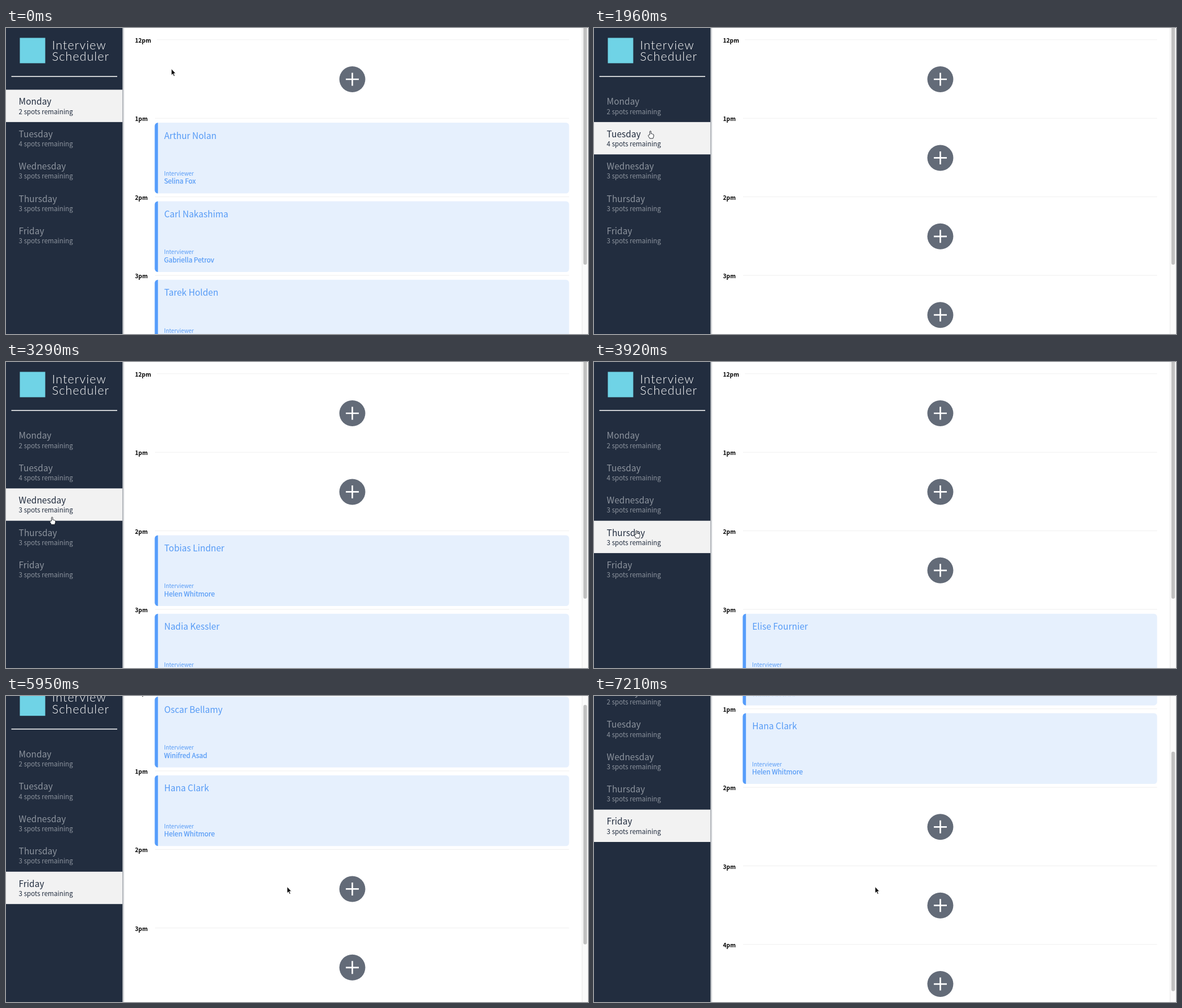
Recreate the animation shown at these times as an HTML page. Size 1031 by 543 pixels, loop 7.28 s.

```html
<!DOCTYPE html>
<html lang="en">
<head>
<meta charset="utf-8">
<title>Interview Scheduler</title>
<style>
html, body { margin: 0; width: 100%; height: 100%; overflow: hidden; background: #fff; }
svg { display: block; width: 1031px; height: 543px; }
text { font-family: 'Noto Sans CJK JP', 'Noto Sans CJK SC', 'Noto Sans CJK KR', 'Noto Sans CJK', sans-serif; }
.title { font: 300 21.5px Lato, sans-serif; letter-spacing: 1.1px; fill: #fff; }
.name { font-size: 15.5px; }
.spots { font-size: 11.6px; font-weight: 300; }
.hour { font-size: 10.2px; font-weight: 700; fill: #000; }
.card { fill: #569bf6; }
.label { font-size: 9.9px; font-weight: 300; }
.who { font-size: 11.9px; stroke: #569bf6; stroke-width: .25px; }
</style>
</head>
<body>
<svg id="stage" viewBox="0 0 1031 543">
  <defs>
    <linearGradient id="shade">
      <stop offset="0" stop-color="#8d929a" stop-opacity=".75"/>
      <stop offset="1" stop-color="#8d929a" stop-opacity="0"/>
    </linearGradient>
  </defs>
  <rect width="1031" height="543" fill="#fff"/>
  <rect width="206.5" height="543" fill="#222d3f"/>
  <g id="page">
    <rect x="24.5" y="17.5" width="45" height="45" fill="#6fd3e6"/>
    <text class="title" x="81.5" y="37.5">Interview</text>
    <text class="title" x="81.5" y="58">Scheduler</text>
    <rect x="9.5" y="85.2" width="187.5" height="1.6" fill="#f4f5f6"/>
    <g id="menu"></g>
    <g id="hours"></g>
  </g>
  <rect x="206.5" width="3.5" height="543" fill="url(#shade)"/>
  <rect x="1020" width="11" height="543" fill="#fafafa"/>
  <rect x="1020" width="1" height="543" fill="#e9e9e9"/>
  <rect id="thumb" x="1022.8" width="6.4" height="425" rx="3.2" fill="#c1c1c1"/>
  <g id="ring" fill="none">
    <circle r="22" stroke="#fff" stroke-opacity=".85" stroke-width="4.8"/>
    <circle r="22" stroke="#0c0f14" stroke-width="2.2"/>
  </g>
  <path id="hand" d="M-1.2 6.6V.9a1.1 1.1 0 0 1 2.2 0V4.6q1.3-.5 1.8.4q1.2-.3 1.6.6q1.4-.1 1.4 1.4V9.2L4.5 13H-1.2L-3.9 8.6Q-4.3 7-2.8 6.8Z" fill="#fff" stroke="#14181f" stroke-width=".9" stroke-linejoin="round"/>
  <path id="arrow" d="M0 0V11.2L2.5 8.9 4.3 13 6.1 12.2 4.3 8.2H7.7Z" fill="#000" stroke="#fff" stroke-width=".8"/>
</svg>
<script>
const LOOP = 7280, STEP = 70, SLOT = 139.4, ROW = 57.4, MENU = 109.5;
const $ = id => document.getElementById(id);

function add(parent, tag, attrs, text) {
  const el = document.createElementNS('http://www.w3.org/2000/svg', tag);
  for (const k in attrs) el.setAttribute(k, attrs[k]);
  if (text) el.textContent = text;
  parent.appendChild(el);
  return el;
}

// One entry per hour from 12pm: [student, interviewer], or 0 when free
const days = [
  ['Monday', 2, [0, ['Arthur Nolan', 'Selina Fox'], ['Carl Nakashima', 'Gabriella Petrov'], ['Tarek Holden', 'Selina Fox'], 0]],
  ['Tuesday', 4, [0, 0, 0, 0, ['Elise Fournier', 'Selina Fox']]],
  ['Wednesday', 3, [0, 0, ['Tobias Lindner', 'Helen Whitmore'], ['Nadia Kessler', 'Selina Fox'], 0]],
  ['Thursday', 3, [0, 0, 0, ['Elise Fournier', 'Helen Whitmore'], ['Oscar Bellamy', 'Winifred Asad']]],
  ['Friday', 3, [['Oscar Bellamy', 'Winifred Asad'], ['Hana Clark', 'Helen Whitmore'], 0, 0, 0]]
];

function freeSlot(g, y) {
  add(g, 'circle', { cx: 613.5, cy: y + 70, r: 23, fill: '#636b78' });
  add(g, 'path', { d: `M602 ${y + 70}h23m-11.5 -11.5v23`, stroke: '#fff', 'stroke-width': 2.7 });
}

function bookedSlot(g, y, [student, who]) {
  const top = y + 7.6;
  add(g, 'rect', { x: 263.5, y: top, width: 734, height: 125.6, rx: 5.5, fill: '#e6f0fd' });
  add(g, 'path', { d: `M269.2 ${top}v125.6a5.7 5.7 0 0 1 -5.7 -5.7v-114.2a5.7 5.7 0 0 1 5.7 -5.7z`, fill: '#569dfb' });
  add(g, 'text', { class: 'card name', x: 280.2, y: y + 36.2 }, student);
  add(g, 'text', { class: 'card label', x: 280, y: y + 101.6 }, 'Interviewer');
  add(g, 'text', { class: 'card who', x: 280, y: y + 116 }, who);
}

['12pm', '1pm', '2pm', '3pm', '4pm', '5pm'].forEach((hour, i) => {
  const y = 21 + i * SLOT, x = i ? 264 : 267.5;
  add($('hours'), 'text', { class: 'hour', x: 228.6, y: y + 4.8 }, hour);
  add($('hours'), 'rect', { x, y: y - .7, width: 997.5 - x, height: 1, fill: '#efefef' });
});

const rows = days.map(([day, spots, slots], i) => {
  const y = MENU + i * ROW;
  const back = add($('menu'), 'rect', { y, width: 206.5, height: ROW });
  const label = add($('menu'), 'g', {});
  add(label, 'text', { class: 'name', x: 22.6, y: y + 26.8 }, day);
  add(label, 'text', { class: 'spots', x: 22.6, y: y + 43.1 }, spots + ' spots remaining');
  const list = add($('page'), 'g', {});
  slots.forEach((s, k) => {
    const top = 21 + k * SLOT;
    s ? bookedSlot(list, top, s) : freeSlot(list, top);
  });
  return { back, label, list };
});

// Pointer legs: first change, last change, end point
const legs = [
  [70, 560, 101, 181],
  [770, 840, 100, 182],
  [1680, 1680, 100, 183],
  [2100, 2450, 89, 250],
  [2590, 2660, 88, 251.5],
  [3080, 3570, 75.5, 299.5],
  [4200, 4480, 75, 303],
  [4620, 4970, 62.5, 363.5],
  [5320, 5670, 498, 338.5]
];
const clicks = [1680, 2660, 3710, 5180];
const picks = [1960, 2870, 3920, 5390];

const clamp = u => Math.min(1, Math.max(0, u));
const progress = (t, a, b) => clamp((t - a + STEP) / (b - a + STEP));
const smooth = u => u * u * (3 - 2 * u);

function pointer(t) {
  let x = 293, y = 72.5;
  for (const [a, b, ex, ey] of legs) {
    const u = smooth(progress(t, a, b));
    x += (ex - x) * u;
    y += (ey - y) * u;
  }
  return [x, y];
}

const show = (el, on) => el.setAttribute('display', on ? 'inline' : 'none');

function draw(ms) {
  const t = Math.floor(ms % LOOP / STEP) * STEP;
  const [x, y] = pointer(t);
  const scroll = 137.5 * (1 - Math.pow(1 - progress(t, 5950, 6440), 1.66));
  const picked = picks.filter(p => t >= p).length;
  const hover = x < 206 ? Math.floor((y + scroll - MENU) / ROW) : -1;
  const overRow = hover >= 0 && hover < days.length;

  rows.forEach(({ back, label, list }, i) => {
    const on = i === picked, hot = i === hover;
    back.setAttribute('fill', on ? '#f2f2f2' : hot ? '#eb5053' : 'none');
    label.setAttribute('fill', on ? '#222d3f' : hot ? '#35303f' : '#8d949e');
    show(list, on);
  });

  $('page').setAttribute('transform', `translate(0 ${-scroll})`);
  $('thumb').setAttribute('y', -5 + .755 * scroll);
  for (const id of ['ring', 'hand', 'arrow']) $(id).setAttribute('transform', `translate(${x} ${y})`);
  show($('ring'), clicks.some(c => t >= c && t < c + 140));
  show($('hand'), overRow);
  show($('arrow'), !overRow);
}

const start = performance.now();
function tick() {
  draw(performance.now() - start);
  requestAnimationFrame(tick);
}
tick();
</script>
</body>
</html>
```
